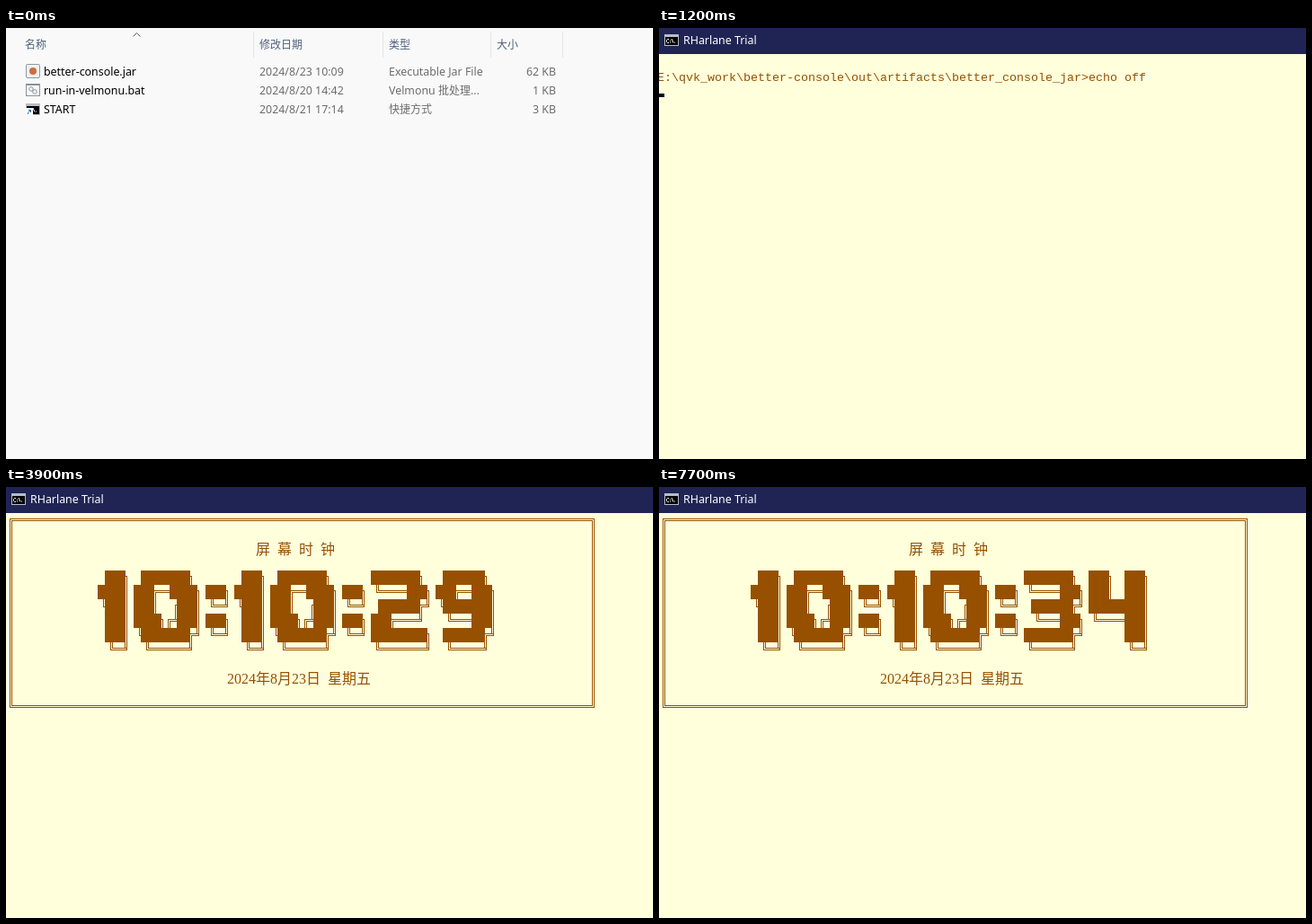
These frames come from a looping animation (720x480 px, 8000 ms). An HTML page:

```html
<!DOCTYPE html>
<html lang="zh-CN">
<head>
<meta charset="utf-8">
<title>Console clock</title>
<style>
html, body { margin: 0; width: 100%; height: 100%; overflow: hidden; background: #f9f9f9; }
svg { display: block; width: 720px; height: 480px; }
text { white-space: pre; }
.ui { font: 12.4px "Noto Sans", "Open Sans", "Noto Sans CJK SC", sans-serif; }
.zh { font: 12px "Noto Sans CJK SC", "Noto Sans CJK", sans-serif; }
.head { fill: #4c607a; }
.info { fill: #6d6d6d; }
.end { text-anchor: end; }
.term { font: 13.333px "Liberation Mono", monospace; fill: #965000; }
.num { font: 16px "Liberation Serif", serif; }
.wide { font: 300 16px "Noto Sans CJK SC", "Noto Sans CJK", sans-serif; }
.crisp { shape-rendering: crispEdges; }
.ink { fill: #965000; }

#pick, #console, #prompt, #clock, #cursor, #seconds { animation: 8s step-end infinite; }
#pick { animation-name: pick; }
#console { animation-name: open; }
#prompt { animation-name: prompt; }
#clock { animation-name: clock; }
#cursor { animation-name: cursor; }
#seconds { animation-name: tick; }

@keyframes pick {
  0% { fill: #f9f9f9; }
  7.5% { fill: #e5f3ff; }
  8.75% { fill: #cce8ff; }
  12.5%, 100% { fill: #d9d9d9; }
}
@keyframes open {
  0% { opacity: 0; transform: none; }
  12.5% { opacity: .6; transform: translate(9px, 5.4px) scale(.98); }
  13.75% { opacity: .93; transform: translate(1px, .6px) scale(.998); }
  15%, 100% { opacity: 1; transform: none; }
}
@keyframes prompt {
  0% { visibility: visible; }
  16.25%, 100% { visibility: hidden; }
}
@keyframes clock {
  0% { visibility: hidden; }
  16.25% { visibility: visible; }
  27.5% { visibility: hidden; }
  28.75%, 100% { visibility: visible; }
}
@keyframes cursor {
  0% { transform: none; opacity: 1; }
  16.25% { transform: translateY(208px); opacity: 1; }
  23.75% { transform: translateY(208px); opacity: 0; }
  27.5% { transform: translateY(-32px); opacity: 1; }
  28.75%, 40%, 52.5%, 65%, 76.25%, 88.75% { transform: translateY(208px); opacity: 1; }
  36.25%, 48.75%, 60%, 72.5%, 85%, 96.25%, 100% { transform: translateY(208px); opacity: 0; }
}
/* each value of the seconds sits one 1000px page further right */
@keyframes tick {
  0% { transform: none; }
  27.5% { transform: translateX(-1000px); }
  40% { transform: translateX(-2000px); }
  52.5% { transform: translateX(-3000px); }
  65% { transform: translateX(-4000px); }
  76.25% { transform: translateX(-5000px); }
  88.75%, 100% { transform: translateX(-6000px); }
}
</style>
</head>
<body>
<svg viewBox="0 0 720 480" xmlns="http://www.w3.org/2000/svg">
  <defs>
    <g id="cmd">
      <rect width="16" height="13" fill="#b9bcc4"/>
      <rect x="1" y="3" width="14" height="9" fill="#000"/>
      <path d="M5 5.5H3.5L2.5 6.5v2l1 1H5M6.5 6.5v1M6.5 8.5v1M8 5l2 4.5M11.5 8.5v1" fill="none" stroke="#fff"/>
    </g>
  </defs>

  <g id="files">
    <rect width="720" height="480" fill="#f9f9f9"/>
    <path class="crisp" d="M275.5 4v29M419.5 4v29M539.5 4v29M619.5 4v29" stroke="#e5e5e5"/>
    <path d="M141.5 9.5l4-4 4 4" fill="none" stroke="#5c5c5c"/>
    <g class="zh head">
      <text x="21" y="23">名称</text>
      <text x="282" y="23">修改日期</text>
      <text x="426" y="23">类型</text>
      <text x="546" y="23">大小</text>
    </g>
    <rect id="pick" class="crisp" x="18" y="80" width="598" height="22"/>

    <rect x="22.5" y="40.5" width="15" height="15" rx="1.5" fill="#eef1f4" stroke="#8f9aa5"/>
    <circle cx="30" cy="48" r="4" fill="#c9703c"/>
    <g fill="none" stroke="#8b9096">
      <rect x="22.5" y="62.5" width="15" height="13" fill="#fbfbfb"/>
      <path d="M23 63.5h14"/>
      <circle cx="28" cy="68" r="2.3"/>
      <circle cx="32" cy="71" r="2.3"/>
    </g>
    <use href="#cmd" x="22" y="84"/>
    <rect x="22" y="89" width="8" height="8" fill="#fff"/>
    <path d="M24.5 96v-1.5l3-3M25 91.5h2.5V94" fill="none" stroke="#2868b8"/>

    <g class="ui">
      <text x="42" y="53">better-console.jar</text>
      <text x="42" y="74">run-in-velmonu.bat</text>
      <text x="42" y="95">START</text>
      <g class="info">
        <text x="282" y="53">2024/8/23 10:09</text>
        <text x="282" y="74">2024/8/20 14:42</text>
        <text x="282" y="95">2024/8/21 17:14</text>
        <text x="426" y="53">Executable Jar File</text>
        <text x="426" y="74">Velmonu <tspan class="zh">批处理</tspan>...</text>
        <text x="426" y="95" class="zh">快捷方式</text>
        <text x="612" y="53" class="end">62 KB</text>
        <text x="612" y="74" class="end">1 KB</text>
        <text x="612" y="95" class="end">3 KB</text>
      </g>
    </g>
  </g>

  <g id="console">
    <rect x="-2.5" y="-1.5" width="800" height="560" fill="none" stroke="#000" stroke-opacity=".06" stroke-width="10"/>
    <rect x="-2.5" y="-1.5" width="800" height="560" fill="#ffffdc" stroke="#1f2454"/>
    <rect x="-2" y="-1" width="800" height="30" fill="#1f2454"/>
    <use href="#cmd" x="6" y="7"/>
    <text class="ui" x="27" y="18" fill="#fff">RHarlane Trial</text>

    <text id="prompt" class="term" x="-2" y="59">E:\qvk_work\better-console\out\artifacts\better_console_jar&gt;echo off</text>

    <g id="clock">
      <g class="crisp" fill="none" stroke="#965000">
        <rect x="4.5" y="35.5" width="650" height="210"/>
        <rect x="6.5" y="37.5" width="646" height="206"/>
      </g>
      <text class="term" x="278" y="75"><tspan class="wide">屏</tspan> <tspan class="wide">幕</tspan> <tspan class="wide">时</tspan> <tspan class="wide">钟</tspan></text>
      <path id="fixed" class="crisp ink"/>
      <g id="seconds" class="crisp ink"></g>
      <text class="term" x="246" y="219"><tspan class="num">2024</tspan><tspan class="wide">年</tspan><tspan class="num">8</tspan><tspan class="wide">月</tspan><tspan class="num">23</tspan><tspan class="wide">日</tspan> <tspan class="wide">星期五</tspan></text>
    </g>

    <rect id="cursor" class="crisp" x="-2" y="73" width="8" height="4" fill="#000023"/>
  </g>
</svg>
<script>
// Box-drawing glyphs as x, y, width, height; 16px wide on an 8px column grid.
const GLYPHS = {
  "█": [[0, 0, 15, 16]],
  "═": [[0, 6, 16, 1], [0, 8, 16, 1]],
  "║": [[6, 0, 1, 16], [8, 0, 1, 16]],
  "╔": [[6, 6, 10, 1], [6, 6, 1, 10], [8, 8, 8, 1], [8, 8, 1, 8]],
  "╗": [[0, 6, 9, 1], [8, 6, 1, 10], [0, 8, 7, 1], [6, 8, 1, 8]],
  "╚": [[6, 0, 1, 9], [6, 8, 10, 1], [8, 0, 1, 7], [8, 6, 8, 1]],
  "╝": [[8, 0, 1, 9], [0, 8, 9, 1], [6, 0, 1, 7], [0, 6, 7, 1]],
};

const DIGITS = {
  0: [" ██████╗ ", "██╔══███╗", "██║  ╔██║", "███╗╔╝██║", "╚██████╔╝", " ╚═════╝ "],
  1: [" ██╗", "███║", "╚██║", " ██║", " ██║", " ╚═╝"],
  2: ["██████╗ ", "╚════██╗", " █████╔╝", "██╔═══╝ ", "███████╗", "╚══════╝"],
  3: ["██████╗ ", "╚════██╗", " █████╔╝", " ╚═══██╗", "██████╔╝", "╚═════╝ "],
  4: ["██╗  ██╗", "██║  ██║", "███████║", "╚════██║", "     ██║", "     ╚═╝"],
  7: ["███████╗", "╚════██║", "    ██╔╝", "   ██╔╝ ", "   ██║  ", "   ╚═╝  "],
  8: [" █████╗ ", "██╔══██╗", "╚█████╔╝", "██╔══██╗", "╚█████╔╝", " ╚════╝ "],
  9: [" █████╗ ", "██╔══██╗", "╚██████║", " ╚═══██║", " █████╔╝", " ╚════╝ "],
  ":": ["   ", "██╗", "╚═╝", "██╗", "╚═╝", "   "],
};

const TOP = 93, CELL = 8, LINE = 16;

const box = (x, y, w, h) => `M${x} ${y}h${w}v${h}h${-w}z`;

function bigText(text, x) {
  let d = "";
  for (const char of text) {
    const rows = DIGITS[char];
    rows.forEach((row, r) => [...row].forEach((glyph, c) => {
      for (const [gx, gy, w, h] of GLYPHS[glyph] || [])
        d += box(x + c * CELL + gx, TOP + r * LINE + gy, w, h);
    }));
    x += (rows[0].length + 1) * CELL;
  }
  return d;
}

document.getElementById("fixed").setAttribute("d", bigText("10:10:", 102));

const seconds = document.getElementById("seconds");
["27", "28", "29", "31", "32", "33", "34"].forEach((value, page) => {
  const path = document.createElementNS(seconds.namespaceURI, "path");
  path.setAttribute("d", bigText(value, 406 + page * 1000));
  seconds.append(path);
});
</script>
</body>
</html>
```
